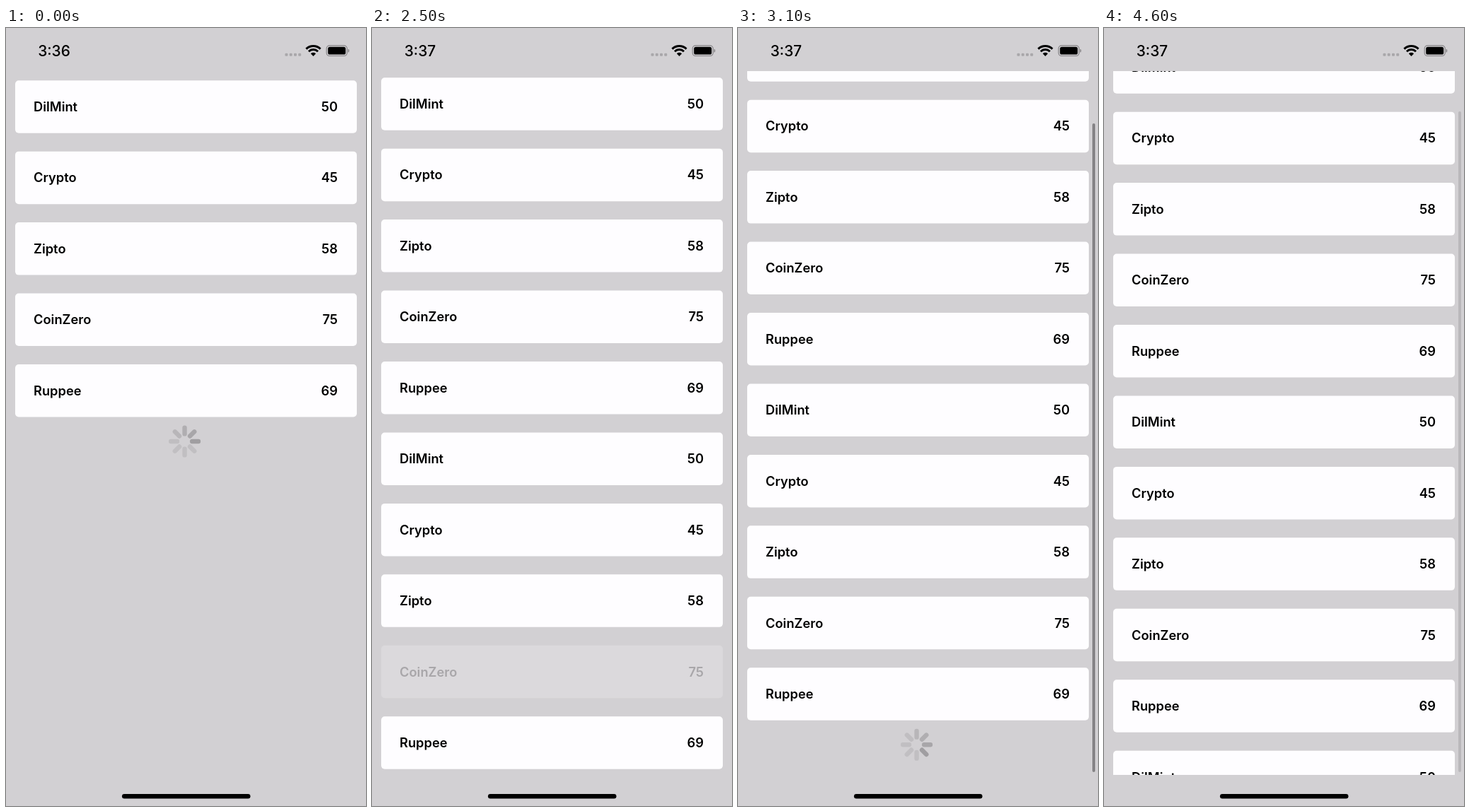
These frames come from a looping animation (509 px wide and 1101 px high, 4700 ms). An HTML page with a canvas:

```html
<!DOCTYPE html>
<html lang="en">
<head>
<meta charset="utf-8">
<title>Endless list</title>
<style>
  html, body { margin: 0; height: 100%; overflow: hidden; background: #d2d0d3; }
  canvas { display: block; }
</style>
</head>
<body>
<canvas id="stage" width="509" height="1101"></canvas>
<script>
const ctx = document.getElementById('stage').getContext('2d');
const LOOP = 4700, TICK = 100;
const ITEMS = [['DilMint', 50], ['Crypto', 45], ['Zipto', 58], ['CoinZero', 75], ['Ruppee', 69]];
const BG = [210, 208, 211], CARD = [254, 253, 255], BLACK = [0, 0, 0];
const LIST = { top: 61, bottom: 1057, first: 74.2, pitch: 100.45, rowHeight: 74.5 };
const REST = 56, PEAK = 129.5;

// Colour at the given opacity over the page background
const over = (color, opacity) =>
  `rgb(${color.map((c, i) => Math.round(BG[i] + (c - BG[i]) * opacity))})`;

function box(x, y, w, h, r, fill) {
  ctx.fillStyle = fill;
  ctx.beginPath();
  ctx.roundRect(x, y, w, h, r);
  ctx.fill();
}

function label(text, x, y, align, font, fill) {
  ctx.font = font + ' Inter, sans-serif';
  ctx.textAlign = align;
  ctx.fillStyle = fill;
  ctx.fillText(text, x, y);
}

// Drag past the end, then a critically damped bounce back
function scrollAt(t) {
  if (t < 2500) return 0;
  if (t < 2900) {
    const p = (t - 2500) / 400;
    return 4 + (PEAK - 4) * p * p * (3 - 2 * p);
  }
  const k = 14 * (t - 2900) / 1000;
  return REST + (PEAK - REST) * (1 + k) * Math.exp(-k);
}

function drawRow(i, y, opacity) {
  const [name, value] = ITEMS[i % ITEMS.length];
  const ink = over(BLACK, opacity);
  box(13, y, 483, LIST.rowHeight, 5, over(CARD, opacity));
  label(name, 39, y + 43.8, 'left', '600 18.3px', ink);
  label(value, 469, y + 43.8, 'right', '600 18.3px', ink);
}

function drawSpinner(y, head) {
  ctx.lineWidth = 6.4;
  ctx.lineCap = 'round';
  for (let arm = 0; arm < 8; arm++) {
    const age = (((head - arm) % 8) + 8) % 8;
    const shade = Math.min(160 + age * 8, 193);
    const a = arm * Math.PI / 4;
    ctx.strokeStyle = `rgb(${shade},${shade - 2},${shade + 1})`;
    ctx.beginPath();
    ctx.moveTo(252.6 + 10.6 * Math.cos(a), y + 10.6 * Math.sin(a));
    ctx.lineTo(252.6 + 19.4 * Math.cos(a), y + 19.4 * Math.sin(a));
    ctx.stroke();
  }
}

function drawList(t) {
  const scroll = scrollAt(t);
  const count = t < 1600 ? 5 : t < 4600 ? 10 : 15;
  const rowTop = i => LIST.first + i * LIST.pitch - scroll;

  ctx.save();
  ctx.beginPath();
  ctx.rect(0, LIST.top, 509, LIST.bottom - LIST.top);
  ctx.clip();
  for (let i = 0; i < count; i++) {
    const pressed = i === 8 && t >= 2500;
    drawRow(i, rowTop(i), pressed ? Math.min(1, 0.2 + 0.8 * (t - 2500) / 250) : 1);
  }
  const spinnerY = rowTop(count - 1) + LIST.rowHeight + 34.5;
  if (t < 1600) drawSpinner(spinnerY, t / TICK);
  else if (t >= 2600 && t < 4600) drawSpinner(spinnerY, (t - 3000) / TICK - (t >= 3900));
  ctx.restore();

  if (t >= 2600) {
    const top = 62 + scroll;
    box(501, top, 4, Math.min(1053, top + 935) - top, 2, t < 4600 ? '#858386' : '#bab8bb');
  }
}

function drawWifi() {
  const cx = 434.5, cy = 40, half = Math.PI / 4.1;
  ctx.save();
  ctx.strokeStyle = ctx.fillStyle = '#000';
  ctx.lineCap = 'butt';
  ctx.lineWidth = 3;
  for (const r of [14.5, 9.4]) {
    ctx.beginPath();
    ctx.arc(cx, cy, r, -Math.PI / 2 - half, -Math.PI / 2 + half);
    ctx.stroke();
  }
  ctx.beginPath();
  ctx.moveTo(cx, cy);
  ctx.arc(cx, cy, 5.2, -Math.PI / 2 - half, -Math.PI / 2 + half);
  ctx.fill();
  ctx.restore();
}

function drawStatusBar(t) {
  label(t < 1600 ? '3:36' : '3:37', 68, 40, 'center', '500 20.9px', '#000');
  for (let i = 0; i < 4; i++) box(394.5 + i * 6.25, 35.7, 4, 4, 1.3, '#a9a7aa');
  drawWifi();
  ctx.strokeStyle = '#858386';
  ctx.lineWidth = 1.2;
  ctx.beginPath();
  ctx.roundRect(453.2, 24.9, 29, 14.6, 4.2);
  ctx.stroke();
  box(455.2, 26.8, 25, 10.8, 2.6, '#000');
  box(483.6, 29.8, 1.6, 4.8, [0, 1.6, 1.6, 0], '#858386');
}

function draw(now) {
  const t = Math.floor(now % LOOP / TICK) * TICK;
  ctx.fillStyle = over(BG, 1);
  ctx.fillRect(0, 0, 509, 1101);
  drawList(t);
  drawStatusBar(t);
  box(164, 1084, 181.5, 6.5, 3.25, '#000');
}

const start = performance.now();
function tick() {
  draw(performance.now() - start);
  requestAnimationFrame(tick);
}
tick();
</script>
</body>
</html>
```
